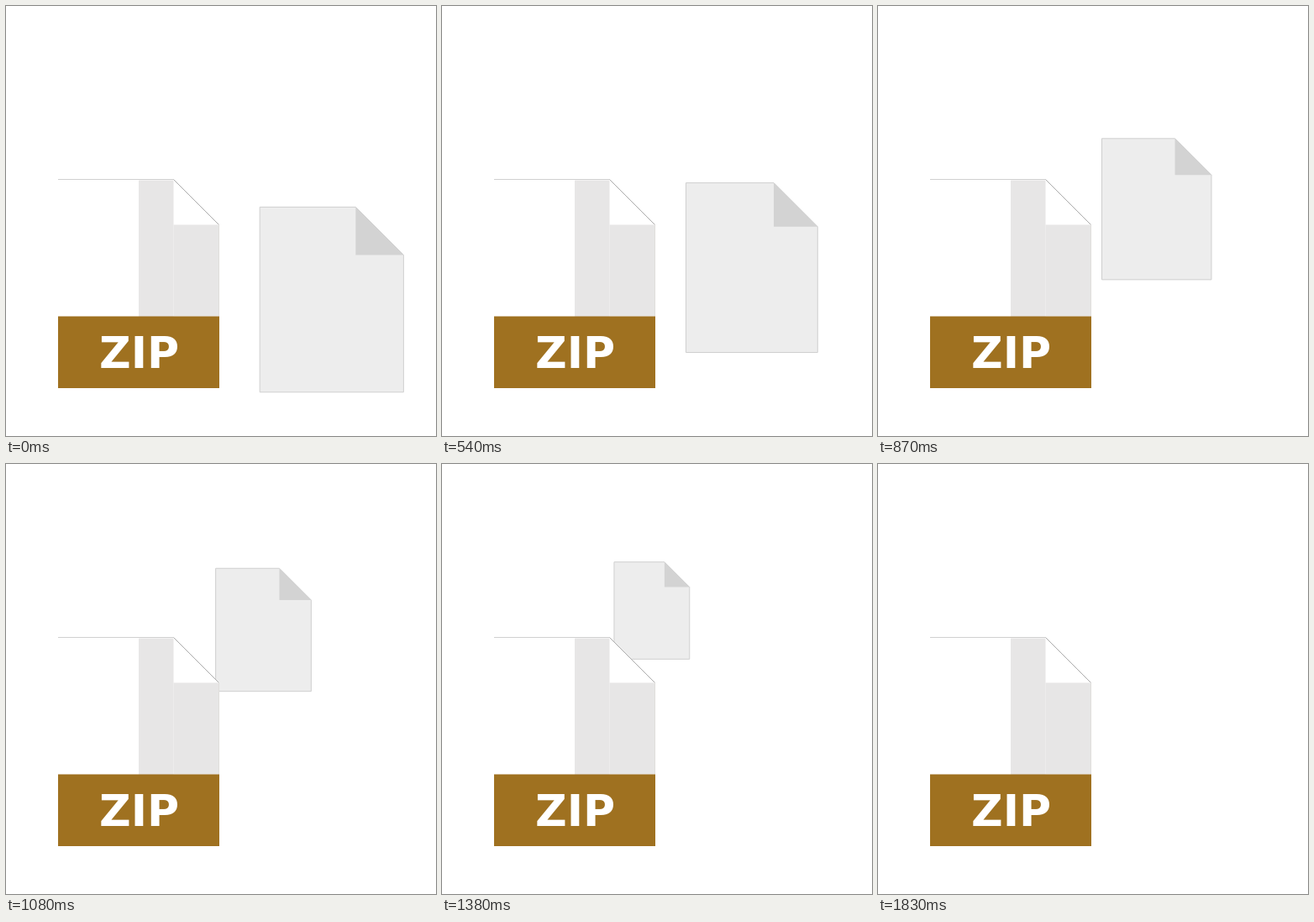
An HTML page with a canvas for the animation above (2190 ms loop, 512x512 px).

```html
<!DOCTYPE html>
<html lang="en">
<head>
<meta charset="utf-8">
<title>Zipping a page</title>
<style>
html, body { margin: 0; width: 100%; height: 100%; overflow: hidden; background: #fff; }
canvas { display: block; width: 512px; height: 512px; }
</style>
</head>
<body>
<canvas id="stage" width="512" height="512"></canvas>
<script>
const ctx = document.getElementById('stage').getContext('2d');
const LOOP = 2190, STEP = 30;
const START = 360, TURN = 1200, END = 1830;
const SHRINK = 0.000466;
const home = { x: 387.8, y: 349.6 };
const arc = { x: 276.5, y: 274, radius: 103, from: -8.4, to: 73.5 };

const lerp = (a, b, p) => a + (b - a) * p;

function onArc(p) {
  const heading = lerp(arc.from, arc.to, p) * Math.PI / 180;
  return {
    x: arc.x - arc.radius * Math.sin(heading),
    y: arc.y - arc.radius * Math.cos(heading)
  };
}

// A slightly bowed rise, then a circular arc down behind the archive
function pageCentre(t) {
  if (t >= TURN) return onArc((t - TURN) / (END - TURN));
  const p = (t - START) / (TURN - START), top = onArc(0);
  return { x: lerp(home.x, top.x, p) + 10 * p * (1 - p), y: lerp(home.y, top.y, p) };
}

function trace(points, close) {
  ctx.beginPath();
  points.forEach(([x, y]) => ctx.lineTo(x, y));
  if (close) ctx.closePath();
}

function fill(points, color) {
  trace(points, true);
  ctx.fillStyle = color;
  ctx.fill();
}

function line(points, color, close) {
  trace(points, close);
  ctx.strokeStyle = color;
  ctx.lineWidth = 1;
  ctx.stroke();
}

function sheet(left, top, right, bottom, fold) {
  return [[left, top], [right - fold, top], [right, top + fold], [right, bottom], [left, bottom]];
}

function drawPage(t) {
  const scale = 1 - (t - START) * SHRINK;
  const { x, y } = pageCentre(t);
  const halfW = 85.6 * scale, halfH = 110.2 * scale, fold = 57 * scale;
  const right = x + halfW, top = y - halfH;
  const outline = sheet(x - halfW, top, right, y + halfH, fold);
  fill(outline, '#ededed');
  fill([[right - fold, top], [right, top + fold], [right - fold, top + fold]], '#d3d3d3');
  line(outline, '#cfcfcf', true);
}

function drawArchive() {
  const left = 62, right = 254, top = 206, bottom = 455, fold = 54.5;
  const middle = (left + right) / 2, band = 369.5, corner = right - fold;
  fill(sheet(left, top, right, bottom, fold), '#fff');
  ctx.fillStyle = '#e7e6e6';
  ctx.fillRect(middle, top + 1.5, corner - middle, band - top);
  ctx.fillRect(corner, top + fold, fold, band - top - fold);
  line([[left, top + 0.5], [corner, top + 0.5]], '#d0d0d0');
  line([[corner, top + 0.5], [right - 0.5, top + fold]], '#aaa');
  line([[right - 0.5, top + fold], [right - 0.5, band]], '#e0dedc');
  ctx.fillStyle = '#9f7120';
  ctx.fillRect(left, band, right - left, bottom - band);
  ctx.fillStyle = '#fff';
  ctx.font = 'bold 52px "DejaVu Sans", sans-serif';
  ctx.fillText('ZIP', 111, 431);
}

function draw(time) {
  const t = Math.floor((time % LOOP) / STEP) * STEP;
  ctx.fillStyle = '#fff';
  ctx.fillRect(0, 0, 512, 512);
  if (t < END) drawPage(Math.max(t, START));
  drawArchive();
}

let origin;
function tick(now) {
  origin ??= now;
  draw(now - origin);
  requestAnimationFrame(tick);
}
draw(0);
requestAnimationFrame(tick);
</script>
</body>
</html>
```
